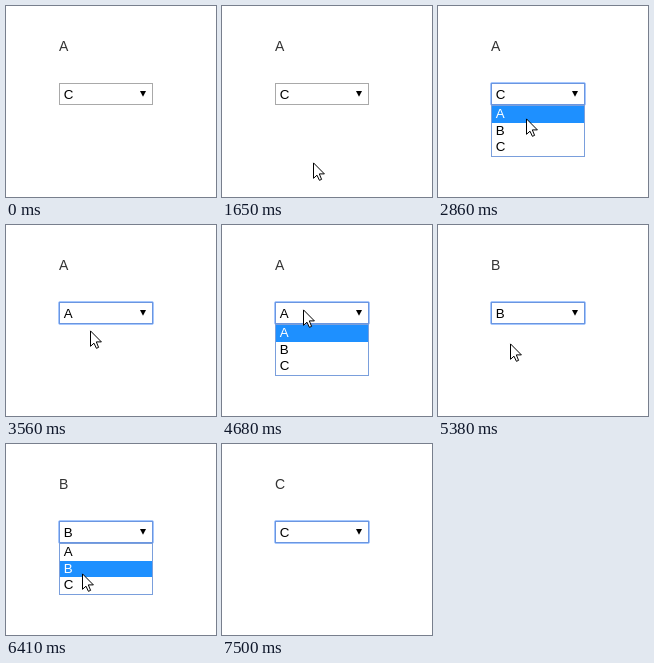
Write an HTML page that moves like this. It is 210 px wide and 191 px high and loops after 7.8 s.

```html
<!DOCTYPE html>
<html lang="en">
<head>
<meta charset="utf-8">
<title>Select demo</title>
<style>
  html, body { margin: 0; width: 210px; height: 191px; overflow: hidden; background: #fff; }
  svg { display: block; }
  text { font: 13.33px Arial, "Liberation Sans", sans-serif; }
  #title { font-size: 14px; fill: #333; }
  .box { fill: #fff; stroke: #a9a9a9; }
  .focus .box { stroke: #6b96e0; }
  .ring { fill: none; stroke: #4d90fe; opacity: 0; }
  .focus .ring { opacity: .5; }
  .frame { fill: #fff; stroke: #7a9fdc; }
  #highlight { fill: #1e90ff; }
  #cursor { fill: #fff; stroke: #000; stroke-linejoin: round; }
</style>
</head>
<body>
<svg id="stage" width="210" height="191">
  <text id="title" x="53" y="45"></text>
  <rect class="ring" x="52.5" y="76.5" width="95" height="23" rx="1.5"/>
  <rect class="box" x="53.5" y="77.5" width="93" height="21"/>
  <text id="value" x="57.7" y="93"></text>
  <path d="M134 85h6l-3 5.7z"/>
  <g id="popup">
    <rect class="frame" x="53.5" y="99.5" width="93" height="51"/>
    <rect id="highlight" x="54" width="92"/>
    <text class="item" x="57.7" y="112">A</text>
    <text class="item" x="57.7" y="129">B</text>
    <text class="item" x="57.7" y="145">C</text>
  </g>
  <path id="cursor" d="M.5 .9V16.3L4 13.2 6.4 18.3 8.6 17.4 6.3 11.9H11.4Z"/>
</svg>
<script>
const LOOP = 7800, STEP = 140, SHOWN = 1650, HIDDEN = 7500;
const LIST_TOP = 100, ROW = 50 / 3;

const start = { x: 91, y: 156 };
const moves = [
  { end: 2070, x: 116, y: 87, steps: 3 },
  { end: 2990, x: 85, y: 115, steps: 3 },
  { end: 3410, x: 84, y: 105, steps: 1 },
  { end: 4520, x: 81, y: 84, steps: 2 },
  { end: 4980, x: 72, y: 118, steps: 1 },
  { end: 5900, x: 74, y: 92, steps: 1 },
  { end: 6410, x: 76, y: 129, steps: 3 },
  { end: 6550, x: 76, y: 133, steps: 1 },
  { end: 7350, x: 151, y: 186, steps: 1 }
];
const picks = [
  { open: 2340, close: 3560, row: 0 },
  { open: 4680, close: 5380, row: 1 },
  { open: 6040, close: 6940, row: 2 }
];

const el = id => document.getElementById(id);
const items = document.querySelectorAll(".item");
const show = (node, on) => node.setAttribute("visibility", on ? "visible" : "hidden");
const easeOut = p => 1 - (1 - p) ** 2;
const rowTop = row => Math.round(LIST_TOP + row * ROW);

// The pointer is sampled in steps, slowing down towards the end of each move.
function pointerAt(t) {
  let { x, y } = start;
  for (const move of moves) {
    const left = Math.ceil((move.end - t) / STEP);
    const p = easeOut(Math.min(1, Math.max(0, 1 - left / move.steps)));
    x += (move.x - x) * p;
    y += (move.y - y) * p;
  }
  return { x: Math.round(x), y: Math.round(y) };
}

function draw(t) {
  const { x, y } = pointerAt(t);
  const picked = picks.findLast(pick => pick.close <= t);
  const selected = picked ? picked.row : 2;
  const open = picks.some(pick => pick.open <= t && t < pick.close);
  const hovered = y < LIST_TOP ? selected : [2, 1, 0].find(row => y >= rowTop(row));

  el("title").textContent = "ABC"[picked ? picked.row : 0];
  el("value").textContent = "ABC"[selected];
  el("stage").classList.toggle("focus", t >= picks[0].open);

  show(el("popup"), open);
  el("highlight").setAttribute("y", rowTop(hovered));
  el("highlight").setAttribute("height", rowTop(hovered + 1) - rowTop(hovered));
  items.forEach((item, i) => item.setAttribute("fill", i === hovered ? "#fff" : "#000"));

  show(el("cursor"), t >= SHOWN && t < HIDDEN);
  el("cursor").setAttribute("transform", `translate(${x} ${y})`);
}

const begin = performance.now();
function tick() {
  draw((performance.now() - begin) % LOOP);
  requestAnimationFrame(tick);
}
tick();
</script>
</body>
</html>
```
